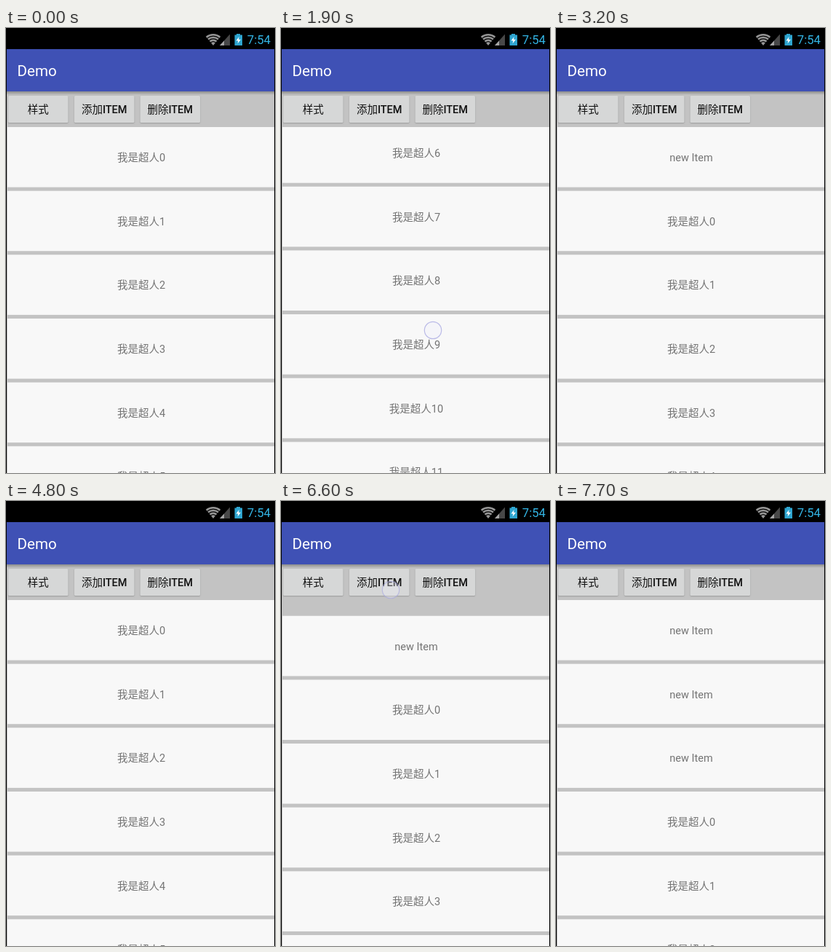
Recreate the animation shown at these times as an HTML page with a canvas. Size 370 by 611 pixels, loop 8000 ms.

```html
<!DOCTYPE html>
<html lang="zh">
<head>
<meta charset="utf-8">
<title>Demo</title>
<style>
html, body { margin: 0; height: 100%; overflow: hidden; background: #000; }
canvas { display: block; width: 370px; height: 611px; }
</style>
</head>
<body>
<canvas></canvas>
<script>
const W = 370, H = 611, TOP = 136, PITCH = 87.65, ROW = 82.6;
const LOOP = 8000, STEP = 100;
const FONT = 'Roboto, "Noto Sans CJK SC", "Noto Sans CJK", sans-serif';

// Swipes: start, duration. Each one scrolls the list by FLING.
const FLING = 265.9;
const swipes = [[500, 500], [1300, 400], [1900, 500]];
const buttons = [['样式', 3], ['添加ITEM', 94], ['删除ITEM', 184.5]];
// Taps: start, x, y, button index
const taps = [
  [2700, 156, 110, 1], [4200, 226, 112, 2], [5300, 153, 114, 1],
  [6400, 151, 122, 1], [7200, 152, 118, 1]
];
const RETURN = 2835, REMOVE = 4370, MOVE = 250, FADE = 120;
const adds = [5417, 6517, 7317];

const canvas = document.querySelector('canvas');
const c = canvas.getContext('2d');
const dpr = window.devicePixelRatio || 1;
canvas.width = W * dpr;
canvas.height = H * dpr;
c.scale(dpr, dpr);

const part = (t, start, length) => Math.min(1, Math.max(0, (t - start) / length));
const sway = p => (1 - Math.cos(Math.PI * p)) / 2;
const smooth = p => p * p * (3 - 2 * p);
const out = p => 1 - (1 - p) ** 2;

function rect(x, y, w, h, fill) {
  c.fillStyle = fill;
  c.fillRect(x, y, w, h);
}

function shape(points, fill) {
  c.fillStyle = fill;
  c.beginPath();
  points.forEach(p => c.lineTo(...p));
  c.fill();
}

function text(s, x, y, size, fill, align = 'center', weight = 400) {
  c.font = `${weight} ${size}px ${FONT}`;
  c.textAlign = align;
  c.fillStyle = fill;
  c.fillText(s, x, y);
}

function statusBar() {
  rect(0, 0, W, 29, '#000');
  // wifi
  for (const [from, to] of [[0, 4.5], [5.7, 8.5], [9.7, 12.3], [13.4, 16]]) {
    c.fillStyle = '#959595';
    c.beginPath();
    c.arc(285, 24, to, -Math.PI * .72, -Math.PI * .28);
    c.arc(285, 24, from, -Math.PI * .28, -Math.PI * .72, true);
    c.fill();
  }
  // signal
  shape([[294, 24], [308, 8.5], [308, 24]], '#484848');
  shape([[294, 24], [300, 17.4], [300, 24]], '#a5a5a5');
  // battery
  rect(317, 8, 5, 2, '#2fa5d0');
  rect(314.5, 9.5, 10.5, 14.5, '#2fa5d0');
  shape([[320.5, 12], [316.5, 17.5], [319.3, 17.5], [318.5, 21.5], [323, 15.8], [320, 15.8]], '#fff');
  text('7:54', 364, 22, 16.7, '#33b5e5', 'right');
}

function row(label, y, alpha = 1) {
  if (alpha <= 0 || y + ROW < TOP || y > H) return;
  c.globalAlpha = alpha;
  rect(2, y, W - 3, ROW, '#f8f8f8');
  text(label, 186, y + 47, 14.5, '#747474');
  c.globalAlpha = 1;
}

function list(t) {
  let scroll = 0;
  for (const [start, length] of swipes) scroll += FLING * out(part(t, start, length));
  let count = 0;
  if (t >= RETURN) {
    count = 1 - sway(part(t, REMOVE + FADE, MOVE));
    scroll = (scroll + PITCH) * (1 - smooth(part(t, RETURN, 360)));
  }
  for (const a of adds) count += sway(part(t, a, MOVE));

  c.save();
  c.beginPath();
  c.rect(2, TOP, W - 3, H - TOP);
  c.clip();
  const yOf = slot => TOP + slot * PITCH - scroll;
  for (let i = 0; i < 20; i++) row('我是超人' + i, yOf(count + i));
  if (t >= RETURN) row('new Item', yOf(count - 1), 1 - part(t, REMOVE, FADE));
  adds.forEach((a, k) => row('new Item', yOf(count - 1 - k), part(t, a + MOVE, FADE)));
  c.restore();
}

function toolbar(t) {
  rect(1, 29, W - 2, 58, '#3f51b5');
  text('Demo', 15.5, 65.5, 20.6, '#fff', 'left');
  const shade = c.createLinearGradient(0, 87, 0, 92);
  shade.addColorStop(0, 'rgba(0,0,0,.28)');
  shade.addColorStop(1, 'rgba(0,0,0,0)');
  rect(1, 87, W - 2, 5, shade);
  buttons.forEach(([label, x], i) => {
    const pressed = taps.some(([start, , , b]) => b === i && t >= start && t < start + 200);
    c.save();
    c.shadowColor = 'rgba(0,0,0,.25)';
    c.shadowBlur = 1.5;
    c.shadowOffsetY = .7;
    c.fillStyle = pressed ? '#c9caca' : '#d6d7d7';
    c.beginPath();
    c.roundRect(x, 93, 82.5, 37, 1.5);
    c.fill();
    c.restore();
    text(label, x + 41.2, 117, 14.5, '#111', 'center', 500);
  });
}

function touch(x, y, alpha) {
  c.globalAlpha = alpha;
  c.beginPath();
  c.arc(x, y, 11.7, 0, 7);
  c.fillStyle = 'rgba(240,240,250,.4)';
  c.fill();
  c.strokeStyle = 'rgba(165,165,225,.75)';
  c.lineWidth = 1.2;
  c.stroke();
  c.globalAlpha = 1;
}

function draw(t) {
  rect(0, 0, W, H, '#000');
  rect(1, 87, W - 2, H - 87, '#c3c3c3');
  statusBar();
  list(t);
  toolbar(t);
  for (const [start, length] of swipes) {
    const moved = FLING * out(part(t, start, length));
    if (t >= start && moved < 225) touch(209, 415 - moved, 1);
  }
  for (const [start, x, y] of taps) {
    if (t >= start && t < start + 300) touch(x, y, t < start + 200 ? 1 : .8);
  }
}

function tick() {
  draw(Math.floor(performance.now() % LOOP / STEP) * STEP);
  requestAnimationFrame(tick);
}
tick();
</script>
</body>
</html>
```
